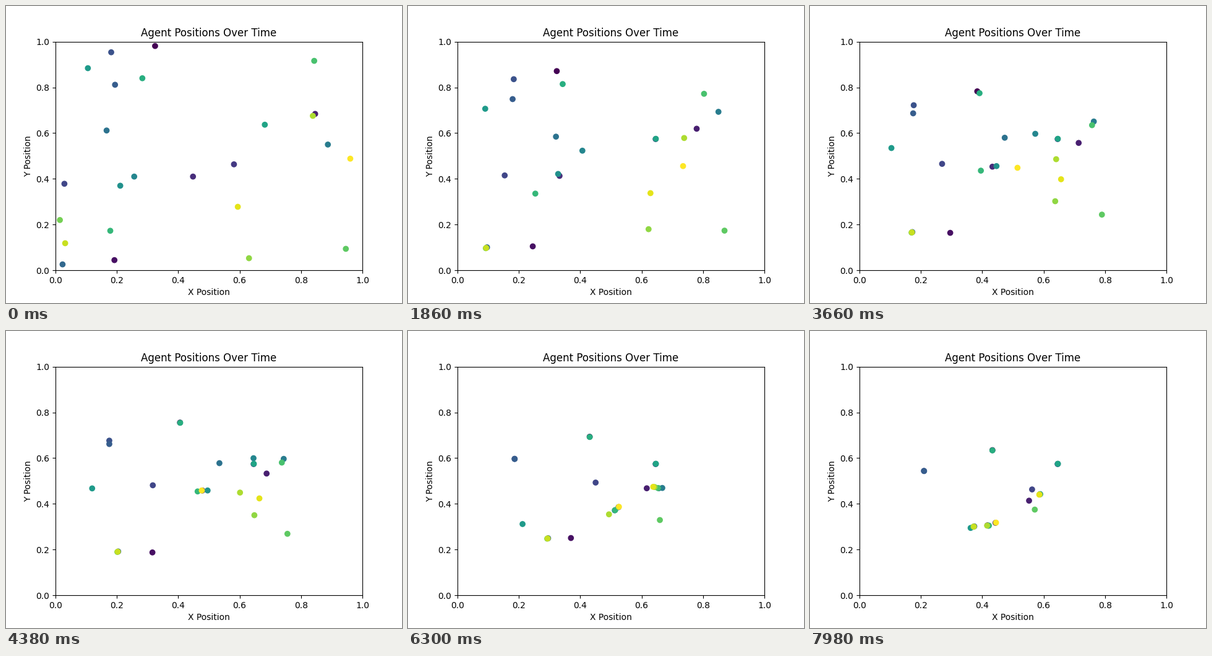
A matplotlib script for the animation above (8000 ms loop, 640 by 480 pixels).

```python
import numpy as np
import matplotlib.pyplot as plt
from matplotlib.animation import FuncAnimation

STEP_MS, TICK_MS, LOOP_MS = 60, 40, 8000
STEPS = LOOP_MS // STEP_MS + 1
SUBSTEPS = 2

# Only the starting state is given; every later place follows from the chase.
# x, y, speed per 1000 steps, agent being chased
START = np.array([
    (.3245, .981, 3.60, 15), (.192, .0447, 2.59, 4), (.846, .684, 3.00, 1),
    (.448, .410, 3.82, 12), (.5815, .4635, 4.73, 14), (.029, .3785, 4.20, 10),
    (.1815, .9535, 3.80, 7), (.194, .8115, 2.08, 19), (.023, .026, 3.37, 17),
    (.1665, .6115, 5.08, 4), (.8875, .550, 4.80, 17), (.2565, .410, 6.08, 17),
    (.211, .370, 4.12, 21), (.1055, .884, 5.75, 19), (.682, .6368, 2.64, 4),
    (.283, .840, 2.10, 21), (.1785, .173, 5.85, 12), (.843, .916, 4.82, 20),
    (.946, .094, 3.55, 6), (.0143, .220, 6.12, 22), (.6305, .053, 4.11, 23),
    (.8385, .6755, 4.49, 1), (.0315, .1185, 3.75, 8), (.594, .2778, 2.23, 2),
    (.9605, .4883, 7.35, 3),
])


def chase(start, steps):
    """Every agent heads for its target at constant speed, never past it."""
    pos = start[:, :2]
    stride = start[:, 2] / 1000 / SUBSTEPS
    target = start[:, 3].astype(int)
    path = [pos]
    for _ in range((steps - 1) * SUBSTEPS):
        gap = pos[target] - pos
        dist = np.hypot(*gap.T)
        reach = np.minimum(stride, dist) / np.maximum(dist, 1e-12)
        pos = pos + gap * reach[:, None]
        path.append(pos)
    return path[::SUBSTEPS]


path = chase(START, STEPS)

fig, ax = plt.subplots(figsize=(6.4, 4.8), dpi=100)
dots = ax.scatter(*path[0].T, c=np.arange(len(START)), cmap="viridis")
ax.set(xlim=(0, 1), ylim=(0, 1), xlabel="X Position", ylabel="Y Position",
       title="Agent Positions Over Time")


def update(tick):
    step = -(-tick * TICK_MS // STEP_MS)  # rounded up
    dots.set_offsets(path[step])
    return dots,


anim = FuncAnimation(fig, update, frames=LOOP_MS // TICK_MS,
                     interval=TICK_MS, repeat=True, repeat_delay=0)
plt.show()
```
